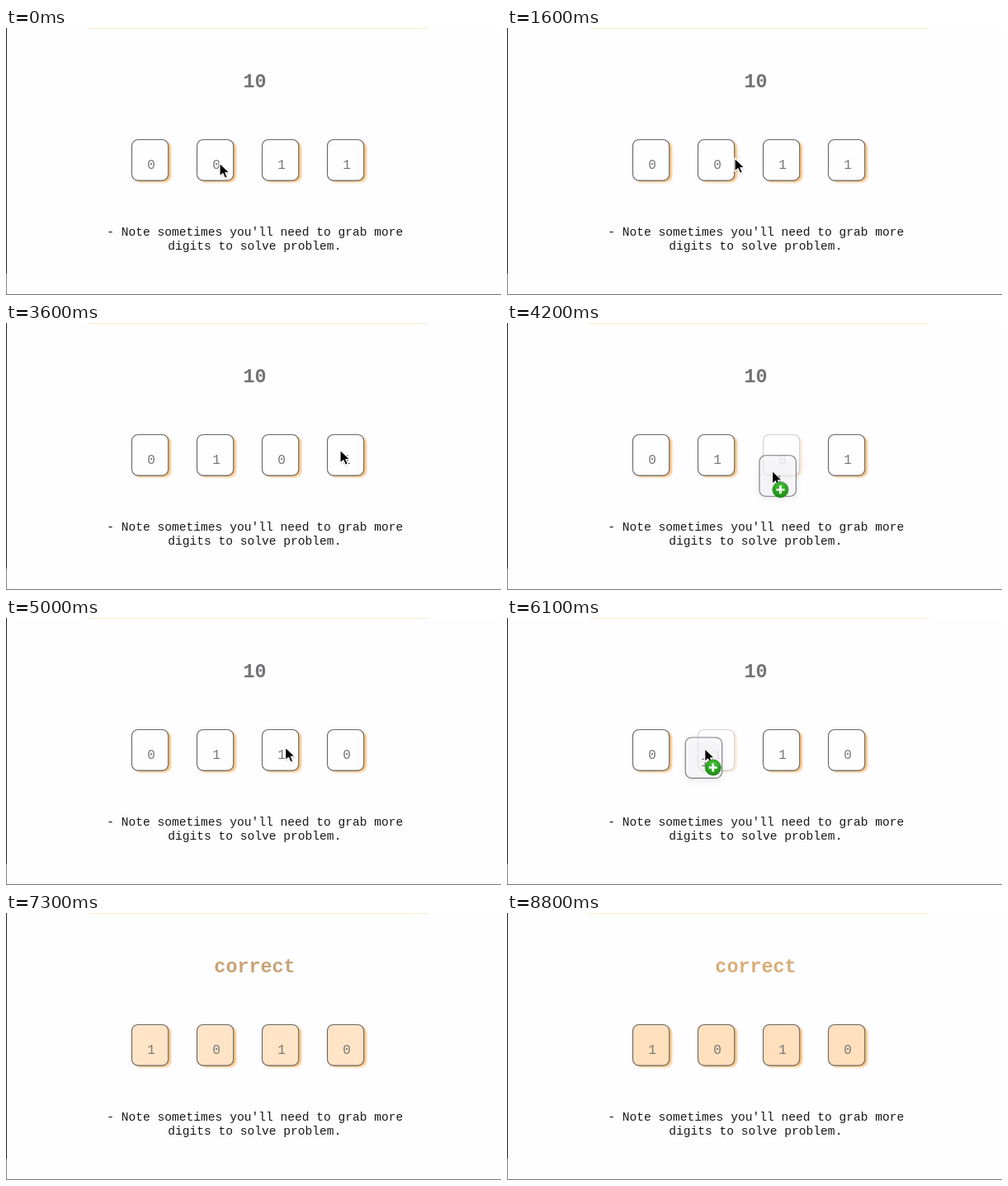
These frames come from a looping animation (600x324 px, 8900 ms). An HTML page:

```html
<!DOCTYPE html>
<html lang="en">
<head>
<meta charset="utf-8">
<title>Binary cards</title>
<style>
  html, body { margin: 0; width: 100%; height: 100%; overflow: hidden; background: #fefdff; }
  svg { display: block; width: 600px; height: 324px; }
  text { font-family: "Liberation Mono", "Courier New", monospace; text-anchor: middle; }
  .title { font-size: 23.4px; font-weight: bold; }
  .digit { font-size: 16px; fill: #777; }
  .note { font-size: 14.6px; fill: #181818; }
  .edge { stroke: #666; stroke-width: 1.1; }
  .shade { fill: #f7c27e; filter: url(#soft); }
  .halo { fill: #000; opacity: .08; filter: url(#wide); }
</style>
</head>
<body>
<svg viewBox="0 0 600 324">
  <defs>
    <filter id="soft" x="-20%" y="-20%" width="140%" height="140%"><feGaussianBlur stdDeviation="0.9"/></filter>
    <filter id="wide" x="-40%" y="-40%" width="180%" height="180%"><feGaussianBlur stdDeviation="5"/></filter>
    <radialGradient id="green" cx=".5" cy=".3" r=".7">
      <stop offset="0" stop-color="#4cc63c"/><stop offset="1" stop-color="#16880f"/>
    </radialGradient>
  </defs>
  <rect width="600" height="324" fill="#fefdff"/>
  <rect x="99" width="413" height="1" fill="#ffeccd"/>
  <rect width="1" height="298" fill="#222"/>
  <rect y="298" width="1" height="26" fill="#888"/>
  <rect y="323" width="600" height="1" fill="#777"/>
  <text class="title" id="title" x="301.5" y="72"></text>
  <g id="cards"></g>
  <text class="note" x="301.8" y="252">- Note sometimes you'll need to grab more</text>
  <text class="note" x="301.3" y="269">digits to solve problem.</text>
  <g id="ghost">
    <rect class="halo" y="3" width="45" height="50" rx="8"/>
    <rect class="edge" x=".5" y=".5" width="44.4" height="49.4" rx="7.5" fill="#fefdff" fill-opacity=".55" stroke-opacity=".85"/>
    <text class="digit" x="24" y="36"></text>
  </g>
  <g id="cursor">
    <path d="M0 0V16L3.9 12.6L6.5 18.4L9.4 17.1L6.9 11.5H12Z" transform="translate(.5 1.5)" opacity=".2" filter="url(#soft)"/>
    <path d="M0 0V16L3.9 12.6L6.5 18.4L9.4 17.1L6.9 11.5H12Z" stroke="#fff" stroke-width="1.2" stroke-linejoin="round"/>
    <g id="badge" transform="translate(10 23)">
      <circle r="9.6" fill="url(#green)" stroke="#2a7d22" stroke-width=".6"/>
      <path d="M-5 0H5M0 -5V5" stroke="#fff" stroke-width="2.6"/>
    </g>
  </g>
</svg>
<script>
  const LOOP = 8900, STEP = 100, SOLVED = 6900, CURSOR_OFF = 7300;
  const TOP = 135, W = 45, H = 50;
  const left = i => 152 + 79 * i;
  const $ = id => document.getElementById(id);

  // Cursor tip: time, x, y
  const path = [
    [0, 259, 164], [450, 296, 162], [900, 270, 165], [1100, 270, 165],
    [1400, 139, 167], [1600, 276, 158], [2000, 327, 160], [2100, 327, 160],
    [2400, 285, 172], [2700, 247, 162], [2900, 247, 162], [3600, 405, 154],
    [3900, 405, 154], [4300, 306, 184], [4700, 340, 155], [4950, 340, 155],
    [5300, 300, 186], [5600, 256, 150], [5900, 256, 150], [6400, 200, 174],
    [6700, 184, 161], [8900, 184, 161]
  ];

  // Each drag swaps the digits of two cards when it ends
  const drags = [
    { start: 2100, end: 2800, from: 2, to: 1, grab: [17, 25] },
    { start: 3900, end: 4700, from: 3, to: 2, grab: [16, 19] },
    { start: 5950, end: SOLVED, from: 1, to: 0, grab: [24, 14] }
  ];

  const slope = (i, k) => (path[i + 1][k] - path[i][k]) / (path[i + 1][0] - path[i][0]);

  // Zero at turning points, harmonic mean elsewhere
  function tangent(i, k) {
    if (i === 0 || i === path.length - 1) return 0;
    const a = slope(i - 1, k), b = slope(i, k);
    return a * b <= 0 ? 0 : 2 * a * b / (a + b);
  }

  function along(t, k) {
    let i = 0;
    while (i < path.length - 2 && t >= path[i + 1][0]) i++;
    const p = path[i], q = path[i + 1], d = q[0] - p[0], u = (t - p[0]) / d;
    const v = 1 - u;
    return v * v * (1 + 2 * u) * p[k] + u * u * (3 - 2 * u) * q[k]
      + d * u * v * (v * tangent(i, k) - u * tangent(i + 1, k));
  }

  $("cards").innerHTML = [0, 1, 2, 3].map(i => `
    <g transform="translate(${left(i)} ${TOP})">
      <rect class="shade" x="3" y="2.2" width="45" height="50" rx="8"/>
      <rect class="edge" x=".5" y=".5" width="44.2" height="49.6" rx="7.5"/>
      <text class="digit" x="24" y="36"></text>
    </g>`).join("");
  const cards = [...$("cards").children];
  const mix = (a, b, u) => `rgb(${a.map((c, i) => Math.round(c + (b[i] - c) * u))})`;
  const show = (el, on) => el.setAttribute("visibility", on ? "visible" : "hidden");

  function draw(t) {
    const x = along(t, 1), y = along(t, 2);
    const digits = [0, 0, 1, 1];
    for (const { end, from, to } of drags)
      if (t >= end) [digits[from], digits[to]] = [digits[to], digits[from]];

    const drag = drags.find(d => t >= d.start && t < d.end);
    const over = drag ? cards.findIndex((c, i) =>
      x >= left(i) && x <= left(i) + W && y >= TOP && y <= TOP + H) : -1;
    const glow = Math.min(1, Math.max(0, (t - SOLVED + STEP) / 600));

    cards.forEach((card, i) => {
      card.setAttribute("opacity", i === over ? .3 : 1);
      card.children[1].setAttribute("fill", mix([254, 253, 255], [255, 223, 188], glow));
      card.children[2].textContent = digits[i];
    });

    $("title").textContent = t >= SOLVED ? "correct" : "10";
    $("title").setAttribute("fill", mix([115, 115, 115], [217, 173, 118], glow));

    show($("ghost"), drag);
    if (drag) {
      $("ghost").setAttribute("transform", `translate(${x - drag.grab[0]} ${y - drag.grab[1]})`);
      $("ghost").lastElementChild.textContent = digits[drag.from];
    }
    $("cursor").setAttribute("transform", `translate(${x} ${y})`);
    $("cursor").setAttribute("display", t < CURSOR_OFF ? "inline" : "none");
    show($("badge"), over >= 0);
  }

  const begin = performance.now();
  function tick() {
    const t = (performance.now() - begin) % LOOP;
    draw(Math.floor(t / STEP) * STEP);
    requestAnimationFrame(tick);
  }
  tick();
</script>
</body>
</html>
```
